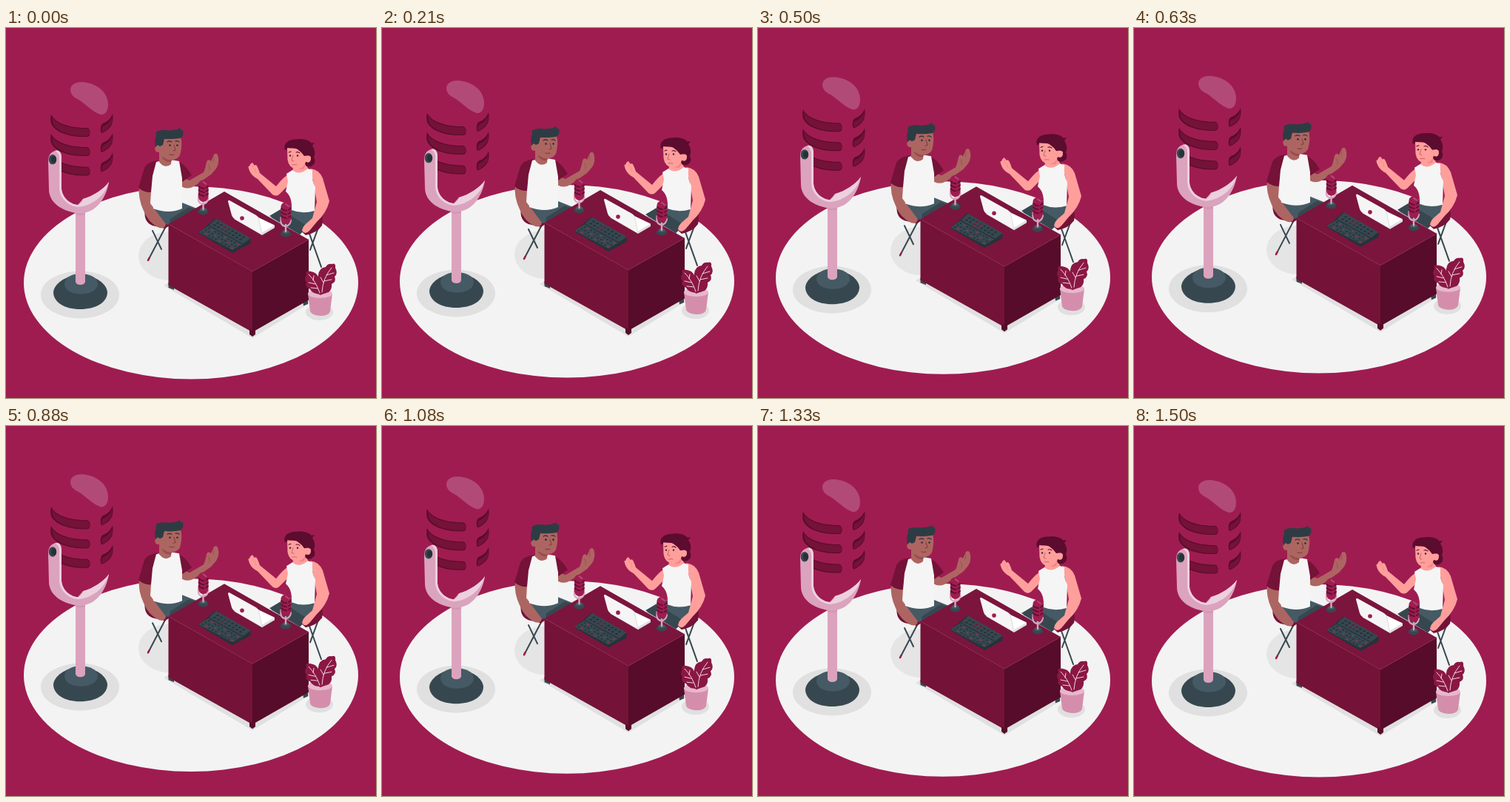
An HTML page that plays this animation: 500x500 px, repeating every 1540 ms.

```html
<!DOCTYPE html>
<html lang="en">
<head>
<meta charset="utf-8">
<title>Podcast studio</title>
<style>
  html, body { margin: 0; width: 100%; height: 100%; overflow: hidden; background: #9f1c51; }
  svg { display: block; width: 100vw; height: 100vh; }
  .wine { fill: #9f1c51; }
  .deep { fill: #741237; }
  .dark { fill: #560c2a; }
  .leaf { fill: #8a1743; }
  .slate { fill: #37474f; }
  .steel { fill: #455a64; }
  .ink { fill: #263238; }
  .white { fill: #f5f5f5; }
  .shade { fill: #e0e0e0; }
  .pink { fill: #dba3bd; }
  .pale { fill: #ecd0dd; }
  .tan { fill: #ad6562; }
  .tanLow { fill: #954e4c; }
  .peach { fill: #ff9f9c; }
  .peachLow { fill: #f08784; }
  .line { fill: none; stroke-linecap: round; stroke-linejoin: round; }
</style>
</head>
<body>
<svg viewBox="0 0 500 500" xmlns="http://www.w3.org/2000/svg">
  <defs>
    <g id="slot">
      <path class="dark" d="M61 117C67 129 86 135 109 135C115 135 115 147 110 147C86 148 66 141 61 129Q59.500 122 61 117Z"/>
      <path class="deep" d="M62 120C70 132 89 136 110 136C114 137 114 145 110 146C88 147 68 140 63 129Z"/>
      <path class="dark" d="M144 116C142 122 137 127 131 129C127 131 127 141 129.500 142C137 139 143 133 144 127Q145 121 144 116Z"/>
      <path class="deep" d="M143.500 120C141 126 137 130 132 132C129 133 128 139 130 141C137 138 142 132 143.500 127Z"/>
    </g>
    <g id="deskMic">
      <ellipse class="slate" cx="0" cy="33" rx="7.200" ry="4.300"/>
      <ellipse class="steel" cx="0" cy="30.500" rx="4.500" ry="2.600"/>
      <path class="line" stroke="#dba3bd" stroke-width="2.400" d="M0 18V30"/>
      <path class="line" stroke="#dba3bd" stroke-width="2.200" d="M-6.500 11V18Q-5 23 0 23Q6 22 7 15"/>
      <path class="wine" d="M-6.500-4Q-6-9 0-9.500Q6-9 7-3V13Q6 20 0 20Q-6 19-6.500 13Z"/>
      <path class="line" stroke="#641031" stroke-width="1.900" d="M-6-1Q-3 2 1 2M4 1L6.500-1M-6 4Q-3 7 1 7M4 6L6.500 4M-6 9Q-3 12 1 12M4 11L6.500 9"/>
      <path class="line" stroke="#b24a77" stroke-width="2" d="M0-7L4-4"/>
    </g>
  </defs>
  <g id="scene">
    <ellipse fill="#f3f3f3" cx="250" cy="344.300" rx="226" ry="130.300"/>
    <ellipse class="shade" cx="100" cy="360.500" rx="53" ry="32"/>
    <ellipse fill="#e5e5e5" cx="221" cy="308" rx="42" ry="33"/>
    <ellipse class="shade" cx="423.500" cy="384" rx="18.500" ry="11"/>
    <path class="shade" d="M213 348L300 297L418 367L333 419Z"/>

    <!-- large microphone -->
    <path class="slate" d="M64 357C65 346 80 334 100 334C122 334 136 346 137 357C137 371 121 380 100 380C80 380 64 371 64 357Z"/>
    <path class="steel" d="M79 345C80 336 90 332 101 332C113 332 123 337 124 345C124 354 114 359.500 101 359.500C88 359.500 79 354 79 345Z"/>
    <path class="pink" d="M94 240H107V343Q106 347 100.500 347Q95 347 94 343Z"/>
    <path fill="#d497b3" d="M94 247Q101 251 107 247V252Q100 254 94 252Z"/>
    <path class="wine" d="M61 110Q62 73 102 72Q142 74 144 118V180Q142 225 102 240Q66 232 61 180Z"/>
    <path fill="#b24a77" d="M87 84C87 77 93 73 102 73C123 74 138 87 138 103C138 112 134 118 128 117C118 114 110 105 100 98C93 94 88 92 87 84Z"/>
    <use href="#slot"/><use href="#slot" y="26"/><use href="#slot" y="52.500"/>
    <path class="pink" d="M57 180C57 171 62 166 69 165.500C73 166 75 170 75 175V217C76 229 86 238 97 239L104 231C118 227 132 218 139 208C136 228 123 250 100 250.500C80 249.500 58 238 58 218Z"/>
    <path class="pale" d="M97 239Q102 237 104 231C118 227 132 218 139 208C134 226 118 240 97 242C84 240 73 231 72 217V176Q72 169 66 166C73 164 75 170 75 176V217C76 229 86 238 97 239Z"/>
    <ellipse class="slate" cx="63" cy="177.700" rx="5.300" ry="6.700"/>
    <ellipse class="ink" cx="64.500" cy="177.700" rx="3.400" ry="4.700"/>

    <!-- man -->
    <path class="line" stroke="#37474f" stroke-width="2" d="M215 270L192 314M198 274L210 299"/>
    <path class="line" stroke="#9f1c51" stroke-width="2.500" d="M193.500 311L192 314"/>
    <path class="deep" d="M188 244Q185 262 198 267L215 271L228 262L206 240Z"/>
    <path class="steel" d="M200 239L238 236L258 244L221 266Q207 265 199 253Z"/>
    <path class="slate" d="M222 258L247 242L257 245L221 266Z"/>
    <path class="tan" d="M236 201L248 206L267 195C270 189 270 183 272 179Q275 177 277 180L281 171Q285 168 286.500 173Q289 182 284 190L277 198L254 214Q245 219 237 214Z"/>
    <path class="line" stroke="#954e4c" stroke-width=".8" d="M273 184Q276 187 275 192M281 174L280 181"/>
    <path class="deep" d="M232 180Q242 184 251 199L238 208Z"/>
    <path class="tan" d="M180 214L196 221L195 237L204 249L216 265Q215 272 207 270Q192 263 186 247Q178 230 180 214Z"/>
    <path class="deep" d="M205 179Q191 181 187 189L179 216Q187 223 197 222L206 207Z"/>
    <path class="white" d="M203 181Q218 176 234 180L238 203V244Q220 252 199 244L196 222L198 200Z"/>
    <path class="tan" d="M207 165L224 174L223 184Q215 191 207 181Z"/>
    <path class="tanLow" d="M210 174L224 178L223 181Q215 182 210 174Z"/>
    <path class="tan" d="M207 151L236 147Q239 158 235 172Q230 180 219 178Q210 175 207 165Z"/>
    <ellipse class="tan" cx="205.500" cy="163" rx="4.200" ry="5"/>
    <path fill="#2d3c43" d="M202 161Q200 150 203 146Q201 140 206 139Q214 137 220 138.500Q230 138 236 135L236 138L239 137.500Q241 147 235 149Q223 151 214 149.500L212 158L208 160L205 158Z"/>
    <circle class="ink" cx="221.500" cy="158.500" r="1.300"/><circle class="ink" cx="231.500" cy="158.500" r="1.300"/>
    <path class="line" stroke="#263238" stroke-width="1.200" d="M218 154Q221 152 224 154M229 153Q232 152 234 154"/>
    <path class="line" stroke="#804139" stroke-width="1.100" d="M227 158L229 165L226 166M221 171Q224 172 227 171"/>

    <!-- woman -->
    <path class="line" stroke="#37474f" stroke-width="2" d="M410 278L426 323M422 270L411 300"/>
    <path class="deep" d="M424 244Q430 257 427 267Q420 277 405 280L396 272L411 244Z"/>
    <path class="steel" d="M385 240L417 241Q420 259 410 267L397 279L358 256Z"/>
    <path class="slate" d="M356 254L371 245L408 268L397 279Z"/>
    <path class="peach" d="M383 197Q376 200 365 214L343 196C340 187 338 183 336 186L333 182Q330 183 329 187Q326 185 329 193Q332 200 340 204L360 225Q366 229 371 223L383 211Z"/>
    <path class="line" stroke="#f08784" stroke-width=".8" d="M333 185L334 190M337 190Q336 193 338 196"/>
    <path class="peach" d="M411 190Q423 191 428 203L437 234Q433 250 420 262L410 274Q404 280 400 274Q401 268 406 264L414 257L420 235L415 207Z"/>
    <path class="peach" d="M389 184L405 181L409 193Q400 205 387 194Z"/>
    <path class="white" d="M379 197L387 192Q396 200 408 190L414 192Q413 208 418 215L417 247Q400 252 386 246Q387 228 378 221L381 207Z"/>
    <path class="peachLow" d="M391 187L405 184L403 190Q396 193 391 187Z"/>
    <path fill="#5c0c2e" d="M377 165C374 155 383 150 393 150.500C402 149 410 152 412.500 155.500L417 155L414 159C418 165 418 171 416 174Q420 184 412 187Q405 189 404 183L408 166L386 162Z"/>
    <path class="peach" d="M380 162Q389 163 402 163Q404 174 412 174Q411 182 405 181Q402 190 393 191Q382 189 380.500 178Z"/>
    <ellipse class="peach" cx="408" cy="177" rx="4" ry="4.800"/>
    <path fill="#5c0c2e" d="M377 163Q387 159 394 164Q400 168 403 173L410 172L412 158L390 152Z"/>
    <circle class="ink" cx="384" cy="172.500" r="1.200"/><circle class="ink" cx="394" cy="172.500" r="1.200"/>
    <path class="line" stroke="#5c0c2e" stroke-width="1.100" d="M382 168L385 167M392 168Q395 167 397 169"/>
    <path class="line" stroke="#d56967" stroke-width="1.100" d="M388 172L386 179L389 180M387 185Q390 184 393 185"/>

    <!-- desk -->
    <path class="slate" d="M219.500 344L227 349V354L219.500 351ZM401 368L408 364V373L402 375.500Z"/>
    <path class="deep" d="M219.500 265L333 329V411L219.500 347.500Z"/>
    <path class="dark" d="M333 329L409 286V367.500L333 411Z"/>
    <path class="dark" d="M329 407L333 409L337 407V414L333 417L329 414Z"/>
    <path fill="#7b153d" d="M219.500 265L295 221L409 286L333 329Z"/>
    <path class="line" stroke="#8c2149" stroke-width=".8" d="M220 265L333 329L409 286"/>

    <!-- laptop -->
    <path class="shade" d="M338 256L363 267V270L346 280L308 258Z"/>
    <path fill="#fff" d="M339 255L363 266.500L345 277Z"/>
    <path class="white" d="M300 234.500Q300 231.500 303 233.500L338 253Q341 255 342 258L346 279L309 258Q306 256 305 253Z"/>
    <path class="line" stroke="#d6d6d6" stroke-width=".8" d="M341 256L346 279"/>
    <circle class="wine" cx="319" cy="257" r="2.800"/>

    <!-- mixer -->
    <path class="ink" d="M260 277L306 304L330.500 291V285L283 257Z"/>
    <path class="slate" d="M260 276L274 267L320 292L306 300Z"/>
    <path class="slate" d="M274 267L284 257.500L330.500 284L320 292Z"/>
    <path class="line" stroke="#263238" stroke-width="1.200" d="M274 267L320 292"/>
    <g id="keys"></g>

    <use href="#deskMic" x="266.500" y="215"/>
    <use href="#deskMic" x="378" y="245"/>

    <!-- plant -->
    <path fill="#d48eac" d="M408 359H441L438 383Q436 389 424.500 389Q413 388 411 383Z"/>
    <ellipse fill="#e6b8cc" cx="424.500" cy="359" rx="16.500" ry="6"/>
    <path class="leaf" d="M424 361Q417 345 422 334Q423 324 432 323Q435 318 440 319Q446 317 445 324Q449 332 444 336Q447 343 440 346Q441 353 436 357Z"/>
    <path class="leaf" d="M427 360Q414 360 411 353Q403 350 406 344Q402 339 406 334Q403 327 412 329Q420 330 422 337Q430 344 427 360Z"/>
    <path class="line" stroke="#f3d4e1" stroke-width="1" d="M427 357Q428 338 440 324M429 344L425 337M430 342L440 340M433 334L443 331M424 358Q419 343 409 333M418 346L409 344M415 341L416 335M421 352L412 351"/>
  </g>
</svg>
<script>
  const LOOP = 1540, LIFT = 8.5, LEAD = 40;
  const scene = document.getElementById("scene");
  const keys = document.getElementById("keys");

  function dot(x, y, fill, rx = 1.2, ry = 0.8) {
    const e = document.createElementNS("http://www.w3.org/2000/svg", "ellipse");
    const attrs = { cx: x, cy: y, rx, ry, fill };
    for (const k in attrs) e.setAttribute(k, attrs[k]);
    keys.append(e);
  }

  // Rows follow the isometric axes of the mixer.
  for (let row = 0; row < 3; row++) {
    for (let col = 0; col < 10; col++) {
      const x = 266 + col * 4.4 + row * 4, y = 276 + col * 2.42 - row * 2.6;
      dot(x, y, (col + row * 2) % 4 === 1 ? "#b8305f" : "#202c32");
    }
  }
  for (let row = 0; row < 2; row++) {
    for (let col = 0; col < 8; col++) {
      const x = 282 + col * 5 + row * 4, y = 266.5 + col * 2.75 - row * 3;
      dot(x, y, col > 1 && col < 4 ? "#741237" : "#202c32", 1.8, 0.9);
    }
  }

  function draw(ms) {
    const angle = 2 * Math.PI * (ms % LOOP + LEAD) / LOOP;
    const y = -LIFT * (1 - Math.cos(angle)) / 2;
    scene.setAttribute("transform", `translate(0 ${y.toFixed(3)})`);
  }

  const start = performance.now();
  function tick() {
    draw(performance.now() - start);
    requestAnimationFrame(tick);
  }
  draw(0);
  requestAnimationFrame(tick);
</script>
</body>
</html>
```
